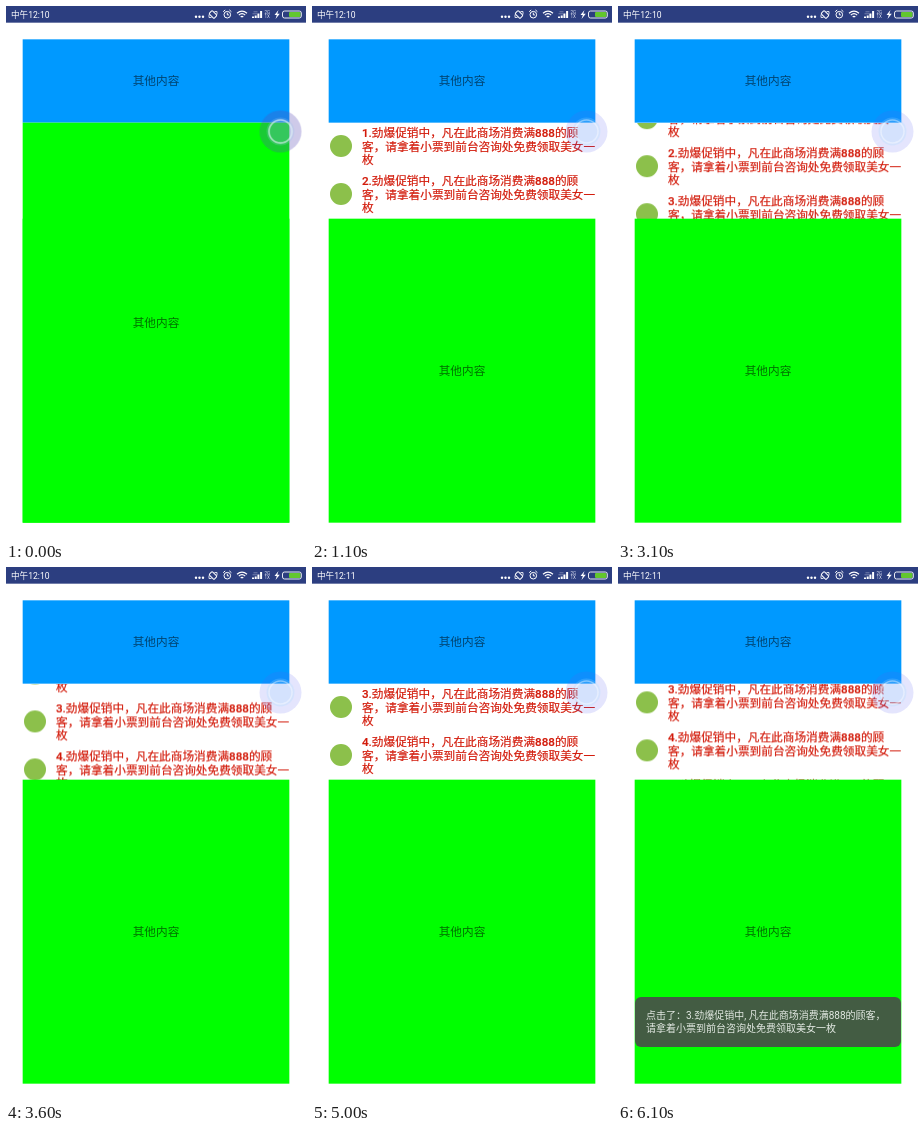
Animation, 300 px wide and 533 px high, one loop 6.2 s. Source, as an HTML page:

```html
<!DOCTYPE html>
<html lang="zh-CN">
<head>
<meta charset="utf-8">
<title>滚动公告</title>
<style>
  html, body { margin: 0; width: 100%; height: 100%; overflow: hidden; background: #fff; }
  body { font-family: Roboto, "Noto Sans CJK SC", "Noto Sans CJK", sans-serif; }
  .stage { position: relative; width: 300px; height: 533px; overflow: hidden; background: #fff; }
  .stage > * { position: absolute; left: 0; top: 0; }

  .stage > .clock { left: 5px; top: 3px; font-size: 8.6px; line-height: 12px; color: #fff; white-space: nowrap; }
  .last { position: absolute; left: 0; top: 0; }

  .panels text { font-size: 11.667px; fill: #000; fill-opacity: .56; text-anchor: middle; }

  .stage > .marquee { left: 16.67px; top: 116.67px; width: 271px; height: 96px; overflow: hidden; }
  .row { position: relative; height: 48px; }
  .row i { position: absolute; left: 1.5px; top: 12.5px; width: 22px; height: 22px; border-radius: 50%; background: #8cc04b; }
  .row p {
    position: absolute; left: 33.33px; top: 4.4px; margin: 0;
    font-size: 11.667px; font-weight: 500; line-height: 13.6px;
    color: #d21a0a; -webkit-text-stroke: .2px #d21a0a; white-space: nowrap;
  }

  .stage > .toast {
    left: 16.67px; top: 430px; width: 266.67px; height: 49.5px; box-sizing: border-box;
    padding: 12px 0 0 11.3px; border-radius: 6px; background: #435c43;
    font-size: 10px; line-height: 13.4px; color: #e4eae4; white-space: nowrap;
  }

  .stage > .ball { left: 252.5px; top: 103.5px; width: 43px; height: 43px; }

  .stage [class*="t-"] { animation: 6200ms linear infinite; }
  .stage .t-slide { animation-name: slide; }
  .stage .t-toast { animation-name: toast; }
  .stage .t-intro { animation-name: intro; animation-timing-function: step-end; }
  .stage .t-early { animation-name: early; animation-timing-function: step-end; }
  .stage .t-late { animation-name: late; animation-timing-function: step-end; }

  @keyframes slide {
    0% { transform: translateY(0); }
    42.42% { transform: translateY(0); animation-timing-function: cubic-bezier(.364, 0, .636, 1); }
    63.39%, 95.4% { transform: translateY(-96px); animation-timing-function: cubic-bezier(.333, 0, .667, .333); }
    100% { transform: translateY(-106.9px); }
  }
  @keyframes toast {
    0%, 81.5% { opacity: 0; }
    87%, 100% { opacity: 1; }
  }
  @keyframes intro {
    0% { opacity: 1; }
    1.61%, 100% { opacity: 0; }
  }
  @keyframes early {
    0% { opacity: 1; }
    64.5%, 100% { opacity: 0; }
  }
  @keyframes late {
    0% { opacity: 0; }
    64.5%, 100% { opacity: 1; }
  }
</style>
</head>
<body>
<div class="stage">
  <div class="marquee"><div class="rows t-slide"></div></div>

  <svg class="panels" width="300" height="533">
    <rect width="300" height="16.67" fill="#2c3e80"/>
    <rect x="16.67" y="33.33" width="266.67" height="83.33" fill="#09f"/>
    <text x="150" y="79">其他内容</text>
    <rect x="16.67" y="212.67" width="266.67" height="304" fill="#0f0"/>
    <text x="150" y="368.500">其他内容</text>
    <g class="t-intro">
      <rect x="16.67" y="116.67" width="266.67" height="400" fill="#0f0"/>
      <text x="150" y="320.500">其他内容</text>
    </g>
  </svg>

  <div class="clock"><span class="t-early">中午12:10</span><span class="last t-late">中午12:11</span></div>

  <svg class="icons" width="300" height="17" fill="none" stroke="#fff">
    <g fill="#fff" stroke="none">
      <circle cx="190" cy="10.7" r="1.2"/><circle cx="193.5" cy="10.7" r="1.2"/><circle cx="197" cy="10.7" r="1.2"/>
      <path d="M246 12v-1.5h2V12zM248.700 12V9.500h2V12zM251.400 12V7.500h2V12zM254.100 12V5h2v7z"/>
      <path d="M272.5 4l-4 5h2.3l-1.3 4 4.3-5.3h-2.5z"/>
      <rect x="283" y="6" width="11.5" height="5" rx="1" fill="#62c72d"/>
    </g>
    <rect x="204.800" y="5" width="4.400" height="7" rx="1" transform="rotate(-45 207 8.500)"/>
    <path d="M203 8.500v3h2.500M211 8.500v-3h-2.500" stroke-width=".8"/>
    <circle cx="221.3" cy="8.7" r="3.3"/>
    <path d="M221.3 6.7v2.2h1.6M217.2 5.7l2-1.8M223.4 3.9l2 1.8"/>
    <path d="M231 7.2q5-4.2 10 0M232.8 9.1q3.2-2.8 6.4 0M234.7 11q1.3-1.2 2.6 0" stroke-width="1.2"/>
    <path d="M246.5 7.8h4.5M247.5 5.8h4" stroke-width=".7" opacity=".5"/>
    <g fill="#dfe3f2" stroke="none" font-size="4.5"><text x="258.5" y="7.6">2G</text><text x="258.5" y="12">1X</text></g>
    <rect x="276.5" y="5" width="18.8" height="7" rx="2" stroke-width=".9"/>
  </svg>

  <svg class="ball" viewBox="-21.5 -21.5 43 43">
    <circle r="21" fill="#5a5cf0" opacity=".16"/>
    <circle r="14" fill="#a0dcff" opacity=".22"/>
    <circle r="11.5" fill="none" stroke="#fff" stroke-width="1.5" opacity=".4"/>
    <g class="t-intro">
      <circle r="21" fill="#604080" opacity=".16"/>
      <circle r="11.5" fill="none" stroke="#dff" stroke-width="1.3" opacity=".5"/>
    </g>
  </svg>

  <div class="toast t-toast">点击了：3.劲爆促销中, 凡在此商场消费满888的顾客，<br>请拿着小票到前台咨询处免费领取美女一枚</div>
</div>
<script>
  const row = n => `<div class="row"><i></i><p>${n}.劲爆促销中，凡在此商场消费满888的顾<br>客，请拿着小票到前台咨询处免费领取美女一<br>枚</p></div>`;
  document.querySelector('.rows').innerHTML = [1, 2, 3, 4, 5, 6].map(row).join('');
</script>
</body>
</html>
```
